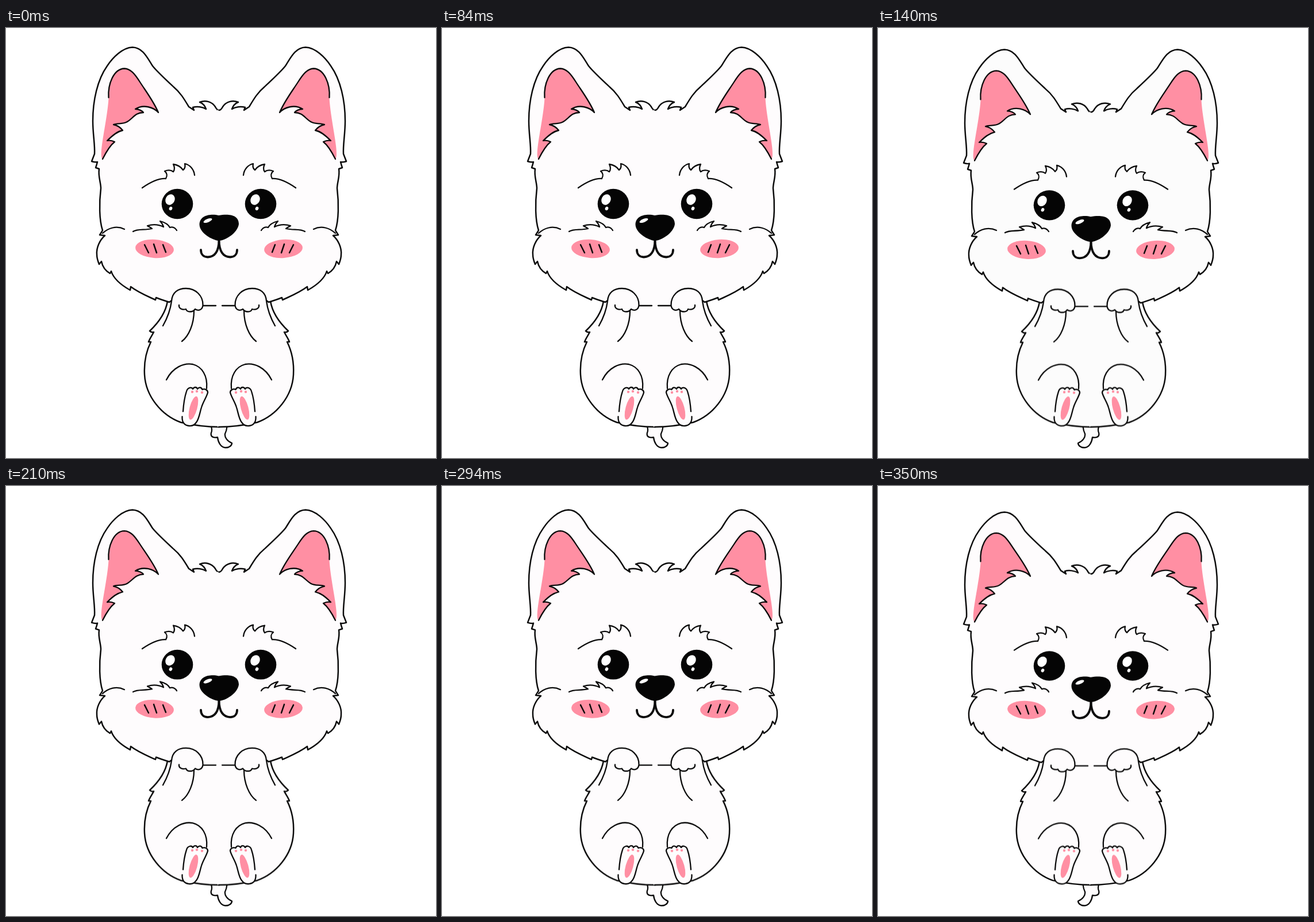
Animation of 748x748 px, one loop 420 ms. Source, as an HTML page:

```html
<!DOCTYPE html>
<html lang="en">
<head>
<meta charset="utf-8">
<title>Bouncing puppy</title>
<style>
  html, body { margin: 0; width: 100%; height: 100%; overflow: hidden; background: #fff; }
  svg { display: block; width: 100vw; height: 100vh; }
  #puppy, #tail { transform-origin: 370.5px 695px; }
  .skin { stroke: none; }
  .line, .shape { stroke: #0b0b0b; stroke-width: 2.3; stroke-linecap: round; stroke-linejoin: round; }
  .line { fill: none; }
  .edge { stroke-width: 2.5; }
  .mouth { stroke-width: 3.8; }
  .pink { fill: #ff8fa3; }
  .ink { fill: #050505; }
  .shine { fill: #fff; }
</style>
</head>
<body>
<svg id="stage" viewBox="0 0 748 748"></svg>
<script>
const path = (cls, d) => `<path class="${cls}" d="${d}"/>`;
const oval = (cls, x, y, rx, ry, turn = 0) =>
  `<ellipse class="${cls}" cx="${x}" cy="${y}" rx="${rx}" ry="${ry}" transform="rotate(${turn} ${x} ${y})"/>`;
// Left half plus its reflection about x = 370.5
const both = half => `<g>${half}</g><g transform="translate(741 0) scale(-1 1)">${half}</g>`;
// Outline of a half, filled up to the centre line
const solid = (d, bottom, top) => path('skin', `${d}L373 ${bottom}V${top}Z`) + path('line edge', d);

const headEdge = `M370.5 143C368 143 366 141 364 137C358 128 347 125 337 129
  C342 131 346 135 348 141C342 137 332 136 325 138L327 143L318 137
  C309 122 303 112 291 102C276 88 262 75 255 66C246 52 238 34 220 33.5
  C203 34 186 51 176 66C159 90 151 126 151 162C151 184 155 204 154 219
  L149 232C152 233 155 234 159 233C158 237 157 240 156 243L162 245
  C160 259 165 268 165 279C162 304 162 334 168 352L163 360L172 361
  C163 369 157 382 158 394C158 401 160 406 162 411L166 406
  C168 416 174 423 181 427L183 423C187 436 200 447 216 456L217 450
  C230 460 245 466 260 473L261 469C271 473 278 475 284 477L288 474`;

const bodyEdge = `M281 475C278 494 267 511 250 527C252 529 254 530 257 529
  C254 535 250 540 248 546L252 546C243 564 240 585 241 603
  C243 641 271 674 304 686C326 691 348 694 371 694`;

const earTop = `M178.5 121C177 98 187 71 206 70.5C217 71 224 80 233 94
  C244 111 257 128 265 147`;
const earFur = `C257 138 239 132 225 141C231 141 237 144 239 147
  C225 147 221 157 211 163C203 168 194 165 187 168C193 169 199 173 203 178
  C193 180 185 187 176 196C180 195 185 196 189 198C180 205 173 218 168 228`;

const ear = path('pink', `${earTop}${earFur}C160 222 177 158 178.5 121Z`)
  + path('line', earTop + earFur);

const brow = path('line', `M237 278C250 269 265 261 278 262C281 257 280 252 276 249
  C281 247 287 247 291 250C294 246 293 241 291 237C298 238 304 241 308 247
  C312 244 312 240 311 236C320 238 327 246 328 256`);

const cheek = path('line', 'M168 357C178 348 192 343 206 350')
  + path('line', `M221 354C229 349 241 352 254 349C252 347 249 346 246 344
    C256 341 266 342 274 346C273 342 271 339 268 336C276 338 282 341 285 347
    C290 345 295 348 297 352`)
  + oval('pink', 258.5, 384, 33.5, 16, 4)
  + path('line edge', 'M241 377L248 391M257 376L262 391M273 377L278 390');

const mouth = path('line mouth', 'M339 386C339 394 344 398.5 351 398.5C363 398 370 389 370.5 370');

const arm = path('line', 'M288 475C286 490 281 504 273 518')
  + path('line', 'M327 492C327 515 318 536 306 545')
  + path('line', 'M343 483H365')
  + path('shape', `M288 475C289 460 299 453 313 453C330 453 343 466 342.5 482
    C342 490 335 493 329 489C325 495 315 495 313 489C307 491 300 488 301 482`);

const leg = path('line', 'M279 612C290 590 310 582 325 585C341 589 351 605 349 627')
  + path('skin', 'M308 667L314 633L327 626L350 632L334 684L308 688Z')
  + path('shape', `M308 667C309 652 311 641 314 632C316 625 323 624 325 628
    C327 624 332 624 333 628C336 624 340 625 341.5 629C345 627 351 629 351 634
    C349 642 343 650 340 660C337 669 336 680 331 686C327 692 322 692.5 318 692
    C309 691 306 684 306.5 676`)
  + oval('pink', 326, 661, 6.5, 21, 15)
  + [[324, 633], [332, 632], [341, 634]].map(([x, y]) => oval('pink', x, y, 2.2, 2.2)).join('');

const tail = path('shape', `M357 693C358 697 359 700 357 704C355 712 362 713 368 712
  C369 721 374 730 382 730C389 730 393 726 393 722C385 719 380 712 381 706
  C383 702 384 698 384.5 693`);

const nose = path('ink', `M336.5 342C337 325 357 323 370 326C386 323 405 324 405 341
  C403 357 381 370 370 370C359 369 337 357 336.5 342Z`)
  + oval('shine', 351, 335, 8, 3, -22);

const eye = (x, glint, dot) => oval('ink', x, 306, 27.3, 26.2)
  + oval('shine', glint, 298.5, 7.8, 9.6, 30)
  + oval('shine', dot, 314, 2.7, 3.3, 25);

document.getElementById('stage').innerHTML = `
  <g id="coat" fill="#fefcfd">
    <g id="tail">${tail}</g>
    <g id="puppy">
      ${both(solid(bodyEdge, 694, 475))}
      ${both(solid(headEdge, 480, 142))}
      ${both(ear + brow + cheek + mouth)}
      ${eye(298, 285.5, 286.5)}${eye(443, 433.5, 436.5)}${nose}
      ${both(arm + leg)}
    </g>
  </g>`;

const LOOP = 420;
// start time, height, tail side, coat colour
const poses = [
  [0, 1, 1, '#fefcfd'],
  [140, 0.994, -1, '#fcfcfc'],
  [210, 0.988, 1, '#fefcfd'],
  [350, 0.982, -1, '#fefcfd'],
];

function play(id, look) {
  const frames = poses.map(p => ({ offset: p[0] / LOOP, easing: 'steps(1, end)', ...look(p) }));
  frames.push({ offset: 1, ...look(poses[poses.length - 1]) });
  document.getElementById(id).animate(frames, { duration: LOOP, iterations: Infinity });
}

play('puppy', ([, tall]) => ({ transform: `scaleY(${tall})` }));
play('tail', ([, , side]) => ({ transform: `scaleX(${side})` }));
play('coat', ([, , , fill]) => ({ fill }));
</script>
</body>
</html>
```
